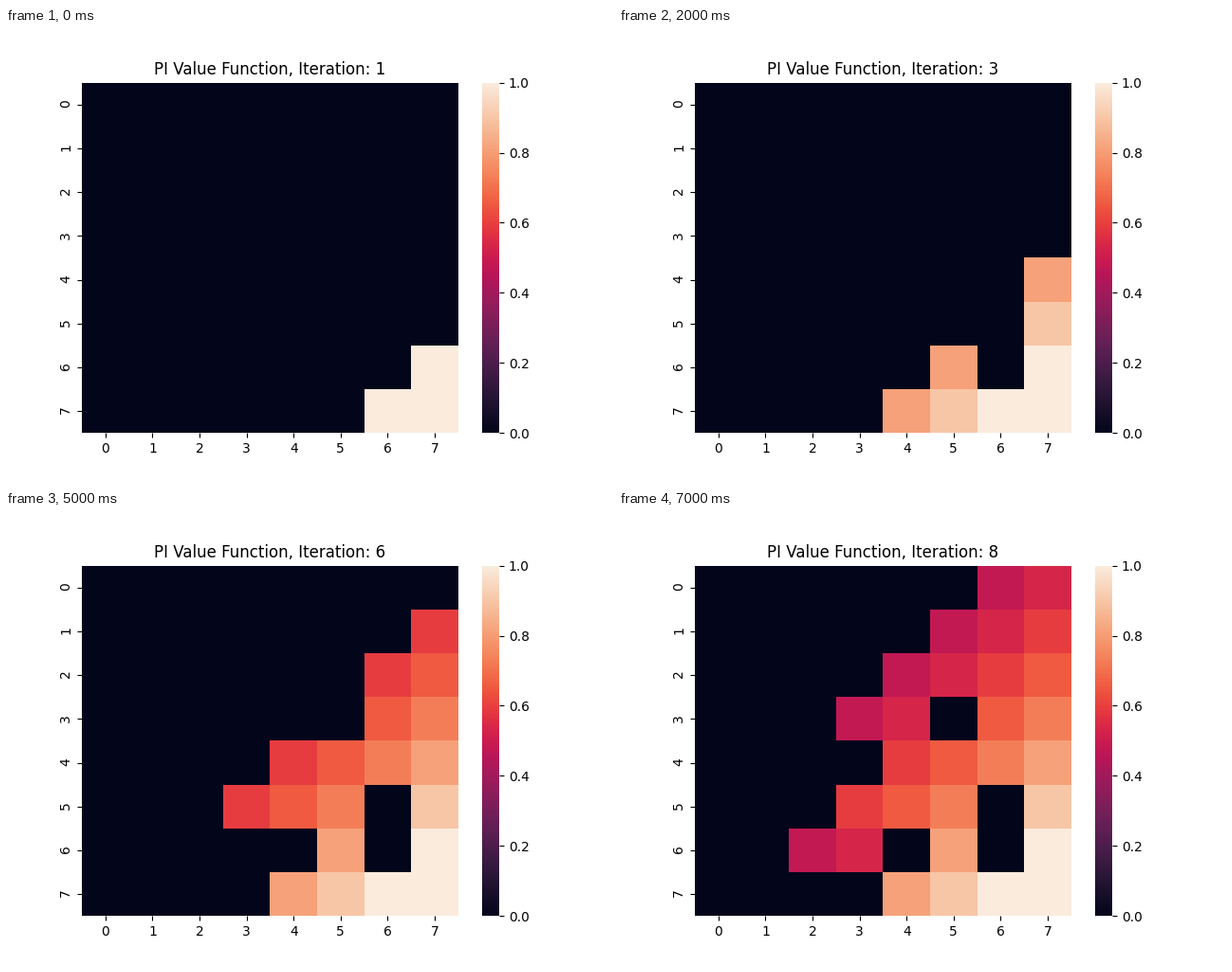
A matplotlib script for the animation above (8000 ms loop, 640 by 480 pixels).

```python
import numpy as np
import matplotlib.pyplot as plt
from matplotlib.animation import FuncAnimation
from matplotlib.colors import LinearSegmentedColormap

SIZE = 8
GAMMA = 0.9
STEPS = 8
GOAL = (7, 7)
HOLES = {(2, 3), (3, 5), (4, 3), (5, 1), (5, 2),
         (5, 6), (6, 1), (6, 4), (6, 6), (7, 3)}

STOPS = [
    (0, "#03051a"), (1 / 11, "#221331"), (1 / 7, "#35193e"),
    (2 / 11, "#451c47"), (1 / 4, "#611f53"), (3 / 11, "#6a1f56"),
    (4 / 11, "#921c5b"), (2 / 5, "#a11a5b"), (3 / 7, "#ad1759"),
    (5 / 11, "#b91657"), (1 / 2, "#cb1b4f"), (6 / 11, "#d92847"),
    (4 / 7, "#e13342"), (3 / 5, "#e83f3f"), (7 / 11, "#ed503e"),
    (2 / 3, "#f06043"), (5 / 7, "#f37651"), (3 / 4, "#f4875e"),
    (4 / 5, "#f69c73"), (6 / 7, "#f6b48f"), (10 / 11, "#f7c9aa"),
    (1, "#faebdd"),
]


def goal_distance():
    """Breadth-first step count from every open cell to the goal."""
    dist = np.full((SIZE, SIZE), np.inf)
    dist[GOAL] = 0
    queue = [GOAL]
    for r, c in queue:
        for cell in ((r - 1, c), (r + 1, c), (r, c - 1), (r, c + 1)):
            inside = 0 <= cell[0] < SIZE and 0 <= cell[1] < SIZE
            if inside and cell not in HOLES and np.isinf(dist[cell]):
                dist[cell] = dist[r, c] + 1
                queue.append(cell)
    return dist


DIST = goal_distance()


def values(iteration):
    worth = GAMMA ** np.maximum(DIST - 1, 0)
    return np.where(DIST <= iteration, worth, 0)


fig, ax = plt.subplots(figsize=(6.4, 4.8), dpi=100)
cmap = LinearSegmentedColormap.from_list("ember", STOPS, N=256)
mesh = ax.pcolormesh(values(1), cmap=cmap, vmin=0, vmax=1, linewidth=0)
ax.set(xlim=(0, SIZE), ylim=(SIZE, 0))
bar = fig.colorbar(mesh, ax=ax)
bar.outline.set_linewidth(0)

ax.spines[:].set_visible(False)
centers = np.arange(SIZE) + 0.5
ax.set_xticks(centers, range(SIZE))
ax.set_yticks(centers, range(SIZE), rotation="vertical")
title = ax.set_title("")


def update(i):
    mesh.set_array(values(i + 1))
    title.set_text(f"PI Value Function, Iteration: {i + 1}")
    return mesh, title


anim = FuncAnimation(fig, update, frames=STEPS, interval=1000,
                     repeat=True, repeat_delay=0)
plt.show()
```
